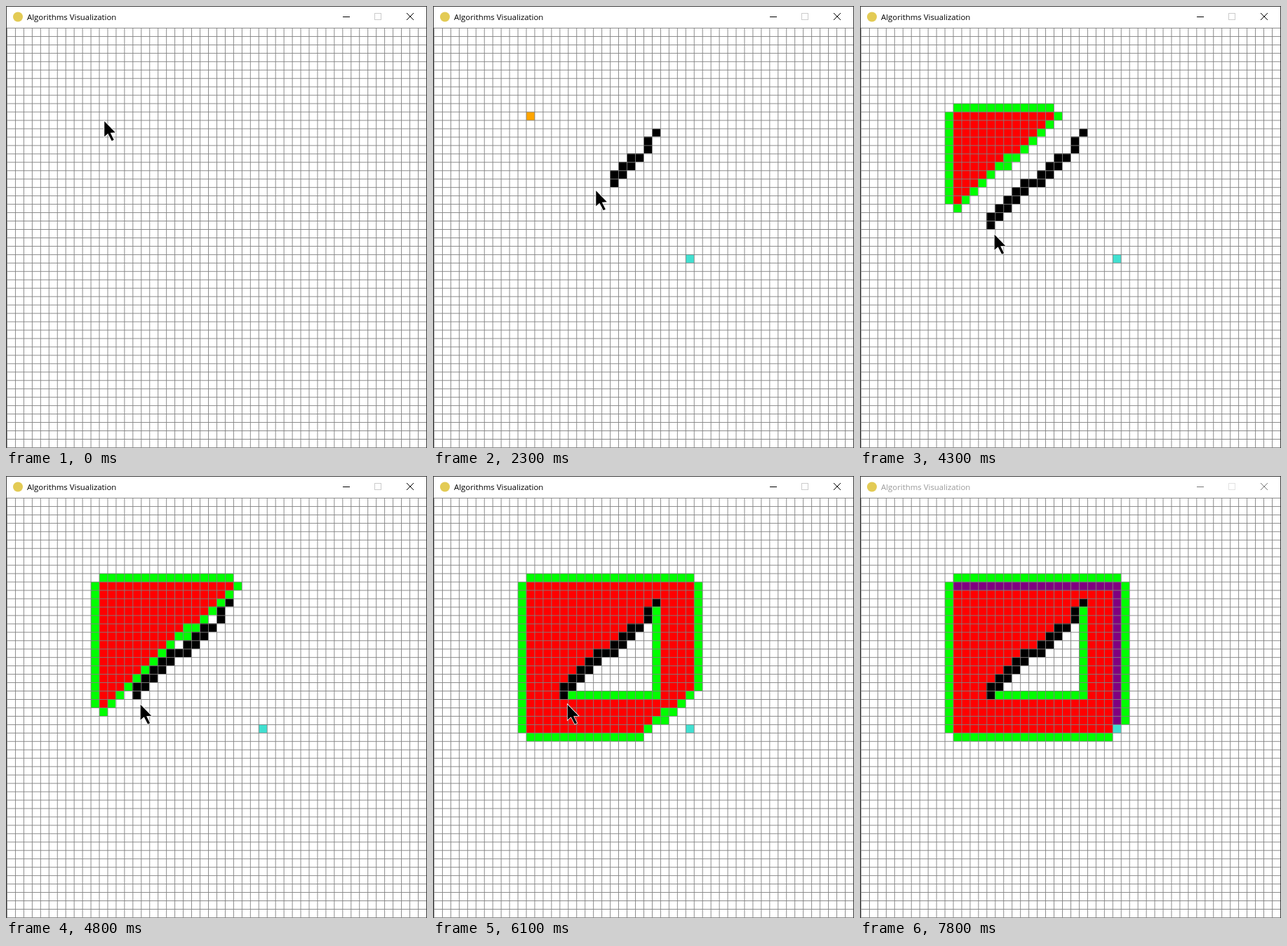
Write an HTML page with a canvas that moves like this. It is 600 px wide and 630 px high and loops after 7.9 s.

```html
<!DOCTYPE html>
<html lang="en">
<head>
<meta charset="utf-8">
<title>Algorithms Visualization</title>
<style>
  html, body { margin: 0; width: 100%; height: 100%; overflow: hidden; background: #fff; }
  canvas { display: block; }
</style>
</head>
<body>
<canvas id="stage" width="600" height="630"></canvas>
<script>
const ctx = document.getElementById('stage').getContext('2d');
const LOOP = 7900, FRAME = 100;
const CELLS = 50, PITCH = 11.96, LEFT = 1, TOP = 31, LINE = 0.9;
const START = [11, 10], END = [30, 27];
const WALL_FROM = 1800, WALL_TO = 2450;

// Keys are a time followed by values; the cursor is given in grid units
const CURSOR = [
  [0, 11.6, 11.1], [300, 11.6, 10.6], [800, 30.5, 27.1], [1000, 30.5, 27.1],
  [1600, 26.1, 13.5], [1800, 26.5, 12.5], [1900, 25.5, 13.5], [2000, 25.5, 14.5],
  [2100, 24.5, 15.5], [2200, 21.2, 18.2], [2300, 19.3, 19.38], [2450, 15.5, 23.2],
  [2700, 15.5, 23.2], [3100, 12.3, 24.5], [3500, 15.9, 24.6], [7300, 15.9, 24.6],
  [7400, 0.2, 26]
];
const STEPS = [[3635, 0], [4800, 126], [5600, 206], [6573, 313]];

function sample(keys, t) {
  const i = keys.findIndex(k => k[0] > t);
  if (i === 0) return keys[0].slice(1);
  if (i < 0) return keys[keys.length - 1].slice(1);
  const a = keys[i - 1], b = keys[i], f = (t - a[0]) / (b[0] - a[0]);
  return a.slice(1).map((v, j) => v + (b[j + 1] - v) * f);
}

// The wall is every cell the cursor crosses during its stroke
function traceWall() {
  const found = new Map();
  for (let t = WALL_FROM + 0.5; t < WALL_TO; t++) {
    const cell = sample(CURSOR, t).map(Math.floor), key = String(cell);
    if (!found.has(key)) found.set(key, { cell, time: t });
  }
  return [...found.values()];
}
const wall = traceWall();

// A* with Manhattan distance: only steps towards the goal are ever expanded
function search() {
  const seen = new Set([...wall.map(w => w.cell), START, END].map(String));
  const queue = [START], opened = [];
  for (let i = 0; i < queue.length; i++) {
    const [x, y] = queue[i];
    opened[i] = [];
    for (const [dx, dy] of [[1, 0], [-1, 0], [0, 1], [0, -1]]) {
      const cell = [x + dx, y + dy];
      if (seen.has(String(cell))) continue;
      seen.add(String(cell));
      opened[i].push(cell);
      if (dx + dy > 0 && cell[0] <= END[0] && cell[1] <= END[1]) queue.push(cell);
    }
  }
  return { queue, opened };
}
const { queue, opened } = search();

const path = [];
for (let y = END[1] - 1; y > START[1]; y--) path.push([END[0], y]);
for (let x = END[0]; x >= START[0]; x--) path.push([x, START[1]]);

const edgeX = k => Math.round(LEFT + PITCH * k);
const edgeY = k => Math.round(TOP + PITCH * k);

function fillCells(cells, color) {
  ctx.fillStyle = color;
  for (const [x, y] of cells)
    ctx.fillRect(edgeX(x), edgeY(y), edgeX(x + 1) - edgeX(x), edgeY(y + 1) - edgeY(y));
}

function drawGrid() {
  ctx.fillStyle = '#808080';
  for (let k = 0; k <= CELLS; k++) {
    ctx.fillRect(LEFT + PITCH * k, TOP, LINE, 599);
    ctx.fillRect(LEFT, TOP + PITCH * k, 598, LINE);
  }
}

function drawWindow(active) {
  ctx.fillStyle = '#e3cb55';
  ctx.beginPath();
  ctx.arc(17, 15.5, 7, 0, 7);
  ctx.fill();

  ctx.fillStyle = active ? '#000' : '#999';
  ctx.font = '11.4px "Open Sans", "Noto Sans", sans-serif';
  ctx.fillText('Algorithms Visualization', 30, 20);

  ctx.lineWidth = 1;
  ctx.strokeStyle = active ? '#000' : '#777';
  ctx.beginPath();
  ctx.moveTo(480, 15.5); ctx.lineTo(490, 15.5);
  ctx.moveTo(571, 10); ctx.lineTo(581, 20);
  ctx.moveTo(581, 10); ctx.lineTo(571, 20);
  ctx.stroke();
  ctx.strokeStyle = active ? '#ccc' : '#e2e2e2';
  ctx.strokeRect(525.5, 10.5, 9, 9);

  ctx.strokeStyle = '#3a3a3a';
  ctx.strokeRect(0.5, 0.5, 599, 640);
}

function drawCursor([x, y]) {
  ctx.save();
  ctx.translate(LEFT + PITCH * x + 0.5, TOP + PITCH * y + 0.5);
  ctx.beginPath();
  [[0, 0], [0, 22], [5, 17.5], [10.5, 28], [13.5, 26.5], [8.5, 16.5], [15.5, 16]]
    .forEach(p => ctx.lineTo(...p));
  ctx.closePath();
  ctx.strokeStyle = '#fff';
  ctx.lineWidth = 1.5;
  ctx.stroke();
  ctx.fillStyle = '#000';
  ctx.fill();
  ctx.restore();
}

function draw(t) {
  ctx.fillStyle = '#fff';
  ctx.fillRect(0, 0, 600, 630);

  const steps = Math.round(sample(STEPS, t)[0]);
  if (t >= 300) fillCells([START], '#ffa500');
  // cells turn black one frame after the cursor has crossed them
  fillCells(wall.filter(w => w.time <= t - FRAME).map(w => w.cell), '#000');
  fillCells(opened.slice(0, steps).flat(), '#0f0');
  // the cell being expanded is still open
  fillCells(queue.slice(0, Math.max(0, steps - 1)), '#f00');
  fillCells(path.slice(0, Math.max(0, steps - queue.length)), '#800080');
  if (t >= 900) fillCells([END], '#40e0d0');

  drawGrid();
  drawWindow(t < 7800);
  if (t < 7500) drawCursor(sample(CURSOR, t));
}

const begin = performance.now();
function tick() {
  const t = (performance.now() - begin) % LOOP;
  draw(Math.floor(t / FRAME) * FRAME);
  requestAnimationFrame(tick);
}
tick();
</script>
</body>
</html>
```
